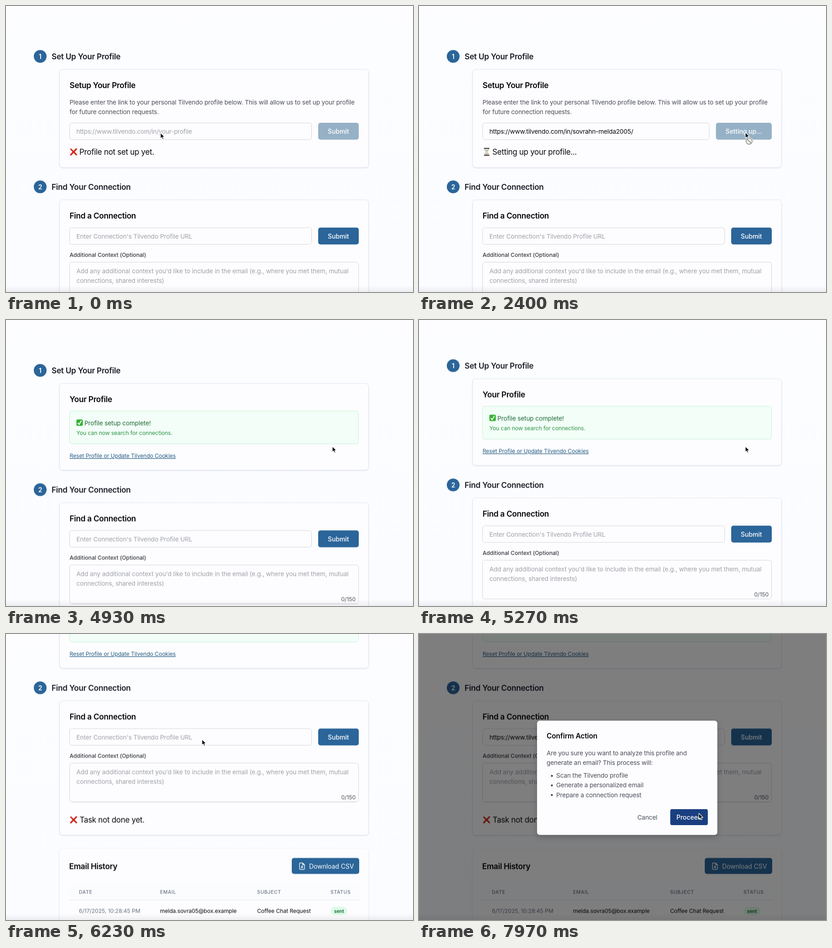
An HTML page that plays this animation: 893x627 px, repeating every 8000 ms.

```html
<!DOCTYPE html>
<html lang="en">
<head>
<meta charset="utf-8">
<title>Profile setup</title>
<style>
html, body { margin: 0; width: 100%; height: 100%; overflow: hidden; background: #fcfdff; }
svg { display: block; width: 893px; height: 627px; }

text { font: 400 13.7px Inter, "Liberation Sans", sans-serif; letter-spacing: -.011em; fill: #4a4e57; }
.heading { font-size: 17.2px; font-weight: 600; letter-spacing: -.015em; fill: #1b1d26; }
.title { font-size: 17.2px; font-weight: 600; letter-spacing: -.016em; fill: #050507; }
.status { font-size: 17px; letter-spacing: -.018em; fill: #0a0a0c; }
.value { letter-spacing: -.013em; fill: #08080a; }
.hint { letter-spacing: -.008em; fill: #9ea1a8; }
.hint.address { letter-spacing: -.018em; }
.small { font-size: 12.2px; letter-spacing: -.007em; }
.label { font-weight: 500; letter-spacing: -.002em; fill: #36393f; }
.caps { font-size: 10.5px; font-weight: 500; letter-spacing: .06em; fill: #6b7280; }
.white { font-size: 14px; font-weight: 500; letter-spacing: -.005em; fill: #fff; }
.digit { font-weight: 600; }
.mid { text-anchor: middle; }

.card { fill: #fdfdff; stroke: #e3e6f1; filter: drop-shadow(0 1px 1px rgba(40, 50, 90, .13)); }
.field { fill: #fdfdff; stroke: #d3d6dd; }
.blue { fill: #2b6599; }
.navy { fill: #193f80; }
.faded { fill: #96b1c6; }
.ring { fill: none; stroke-width: 2; }

/* Every part shares one 8 s clock. */
[class*="t-"] { animation: 8s step-end infinite; }
.t-empty { animation-name: empty; }
.t-pasted { animation-name: pasted; }
.t-ring { animation-name: ring; }
.t-hover { animation-name: hover; }
.t-form { animation-name: form; }
.t-busy { animation-name: busy; }
.t-setup { animation-name: setup; }
.t-done { animation-name: done; }
.t-lower { animation-name: lower; }
.t-empty2 { animation-name: empty2; }
.t-pasted2 { animation-name: pasted2; }
.t-ring2 { animation-name: ring2; }
.t-hover2 { animation-name: hover2; }
.t-modal { animation-name: modal; }
.t-proceed { animation-name: proceed; }
.t-arrow { animation-name: arrow; }
.t-hand { animation-name: hand; }
.t-scroll { animation-name: scroll; }
.t-pointer { animation-name: pointer; }

@keyframes empty { 0% { opacity: 1 } 11.25%, 100% { opacity: 0 } }
@keyframes pasted { 0% { opacity: 0 } 11.25%, 100% { opacity: 1 } }
@keyframes ring { 0% { opacity: 0 } 6.25% { opacity: 1 } 25%, 100% { opacity: 0 } }
@keyframes hover { 0% { opacity: 0 } 19.5% { opacity: 1 } 25%, 100% { opacity: 0 } }
@keyframes form { 0% { opacity: 1 } 25%, 100% { opacity: 0 } }
@keyframes busy { 0% { opacity: 0 } 25% { opacity: 1 } 53.75%, 100% { opacity: 0 } }
@keyframes setup { 0% { opacity: 1 } 53.75%, 100% { opacity: 0 } }
@keyframes done { 0% { opacity: 0 } 53.75%, 100% { opacity: 1 } }
@keyframes lower { 0% { transform: none } 53.75%, 100% { transform: translateY(-24.5px) } }
@keyframes empty2 { 0% { opacity: 1 } 82.5%, 100% { opacity: 0 } }
@keyframes pasted2 { 0% { opacity: 0 } 82.5%, 100% { opacity: 1 } }
@keyframes ring2 { 0% { opacity: 0 } 78.75% { opacity: 1 } 91.875%, 100% { opacity: 0 } }
@keyframes hover2 {
  0%, 72.25%, 91.875%, 100% { opacity: 0 }
  70%, 87.75% { opacity: 1 }
}
@keyframes modal { 0% { opacity: 0 } 91.875%, 100% { opacity: 1 } }
@keyframes proceed { 0% { opacity: 0 } 97.25%, 100% { opacity: 1 } }
@keyframes arrow {
  0%, 25%, 72.5%, 100% { opacity: 1 }
  20%, 70% { opacity: 0 }
}
@keyframes hand {
  0%, 25%, 72.5%, 100% { opacity: 0 }
  20%, 70% { opacity: 1 }
}
@keyframes scroll {
  0% { transform: none }
  65% { transform: none; animation-timing-function: cubic-bezier(.35, 0, .6, .95) }
  71.625% { transform: translateY(-229.5px); animation-timing-function: ease-out }
  75%, 100% { transform: translateY(-254px) }
}
@keyframes pointer {
  0% { transform: translate(339px, 278px) }
  13.75% { transform: translate(339px, 278px); animation-timing-function: ease-in }
  17.5% { transform: translate(624px, 273px); animation-timing-function: ease-out }
  20.5% { transform: translate(716px, 277px) }
  73% { transform: translate(716px, 277px); animation-timing-function: ease-in-out }
  77.5% { transform: translate(430px, 231px) }
  83.75% { transform: translate(430px, 231px); animation-timing-function: ease-in-out }
  88.5% { transform: translate(731px, 229px) }
  92.5% { transform: translate(731px, 229px); animation-timing-function: ease-in-out }
  98.75%, 100% { transform: translate(614px, 393px) }
}
</style>
</head>
<body>
<svg viewBox="0 0 893 627">
  <defs>
    <linearGradient id="sky" x2="0" y2="1">
      <stop offset="0" stop-color="#fdfdff"/>
      <stop offset=".12" stop-color="#fcfdff"/>
      <stop offset="1" stop-color="#fafcff"/>
    </linearGradient>
    <linearGradient id="foot" x2="0" y2="1">
      <stop offset="0" stop-opacity="0"/>
      <stop offset="1" stop-opacity=".06"/>
    </linearGradient>
    <text id="url" class="value">https://www.tilvendo.com/in/sovrahn-melda2005/</text>
    <path id="cross" d="M1 3 3 1 8.7 6.4 14.5.5 17 2.8 11.2 8.8 17 14.8 14.8 17 8.8 11.2 3 17.2.6 15 6.3 8.8Z" fill="#cf2a1c"/>
    <rect id="button" width="89" height="37" rx="5"/>
    <rect id="field" class="field" x="139.5" width="531" height="36.5" rx="5"/>
    <rect id="ring" x="138.5" width="533" height="38.5" rx="6"/>
  </defs>

  <rect width="893" height="627" fill="url(#sky)"/>

  <g class="t-scroll">
    <circle class="blue" cx="75" cy="110.5" r="14"/>
    <text class="white digit mid" x="75" y="115.5">1</text>
    <text class="heading" x="100" y="117">Set Up Your Profile</text>

    <g class="t-setup">
      <rect class="card" x="117.5" y="139" width="678" height="215" rx="7"/>
      <text class="title" x="139.5" y="179.5">Setup Your Profile</text>
      <text x="139.5" y="215.5">Please enter the link to your personal Tilvendo profile below. This will allow us to set up your profile</text>
      <text x="139.5" y="236.5">for future connection requests.</text>

      <g class="t-form">
        <use href="#field" y="256.5"/>
        <use href="#ring" class="ring t-ring" y="255.5" stroke="#c3d4ee"/>
        <text class="hint address t-empty" x="154.5" y="280">https://www.tilvendo.com/in/your-profile</text>
        <use href="#url" class="t-pasted" x="154.5" y="280"/>
        <use href="#button" class="faded" x="685" y="256"/>
        <use href="#button" class="blue t-pasted" x="685" y="256"/>
        <use href="#button" class="navy t-hover" x="685" y="256"/>
        <text class="white mid" x="729.3" y="280">Submit</text>
        <use href="#cross" x="139.5" y="311"/>
        <text class="status" x="161" y="326">Profile not set up yet.</text>
      </g>

      <g class="t-busy">
        <rect class="field" x="139.5" y="256.5" width="497.5" height="36.5" rx="5"/>
        <use href="#url" x="154.5" y="280"/>
        <rect class="faded" x="651.5" y="256" width="122.5" height="37" rx="5"/>
        <text class="white mid" x="712.5" y="280">Setting up...</text>
        <g transform="translate(142 311)">
          <path d="M2 2H11C11 6 8 7 7.5 8.7 8 10.5 11 11.5 11 15.5H2C2 11.5 5 10.5 5.5 8.7 5 7 2 6 2 2Z" fill="#e8eef2" stroke="#8b949b"/>
          <path d="M3.5 4.5H9.5L6.5 8ZM3 15C4 12.5 5.5 12 6.5 11 7.5 12 9 12.5 10 15Z" fill="#d6ae68"/>
          <path d="M.5 1H12.5M.5 16.5H12.5" stroke="#4c4038" stroke-width="2"/>
        </g>
        <text class="status" x="161" y="326">Setting up your profile...</text>
      </g>
    </g>

    <g class="t-done">
      <rect class="card" x="117.5" y="139" width="678" height="190" rx="7"/>
      <text class="title" x="139.5" y="179.5">Your Profile</text>
      <rect x="139.5" y="199.5" width="634" height="72" rx="5" fill="#f2fef7" stroke="#c3f3d6"/>
      <rect x="154.5" y="218" width="14" height="14" rx="2.5" fill="#34b233"/>
      <path d="M157.5 225.5 160.5 229 165.5 220.5" fill="none" stroke="#fff" stroke-width="2"/>
      <text x="172" y="230.5" style="fill:#23693a">Profile setup complete!</text>
      <text class="small" x="154.5" y="252" style="fill:#2f9045">You can now search for connections.</text>
      <text class="small" x="139.5" y="302" style="fill:#285d84" text-decoration="underline">Reset Profile or Update Tilvendo Cookies</text>
    </g>

    <g class="t-lower">
      <circle class="blue" cx="75" cy="396.5" r="14"/>
      <text class="white digit mid" x="75" y="401.5">2</text>
      <text class="heading" x="100" y="403">Find Your Connection</text>

      <rect class="card" x="117.5" y="425" width="678" height="294.5" rx="7"/>
      <text class="title" x="139.5" y="466">Find a Connection</text>
      <use href="#field" y="486"/>
      <use href="#ring" class="ring t-ring2" y="485" stroke="#4677cc"/>
      <text class="hint t-empty2" x="154.5" y="509.5">Enter Connection's Tilvendo Profile URL</text>
      <use href="#url" class="t-pasted2" x="154.5" y="509.5"/>
      <use href="#button" class="blue" x="685" y="485.8"/>
      <use href="#button" class="navy t-hover2" x="685" y="485.8"/>
      <text class="white mid" x="729.3" y="509.5">Submit</text>

      <text class="small label" x="139.5" y="550">Additional Context (Optional)</text>
      <rect class="field" x="139.5" y="561.5" width="634" height="85" rx="5"/>
      <text class="hint" x="154.5" y="585.5">Add any additional context you'd like to include in the email (e.g., where you met them, mutual</text>
      <text class="hint" x="154.5" y="606.5">connections, shared interests)</text>
      <text class="small" x="767" y="640.5" text-anchor="end">0/150</text>
      <use href="#cross" x="139.5" y="677"/>
      <text class="status" x="161.5" y="692">Task not done yet.</text>

      <rect class="card" x="117.5" y="748.5" width="678" height="300" rx="7" style="stroke:#f3f4fa"/>
      <text class="title" x="138.5" y="793.5">Email History</text>
      <rect class="blue" x="627" y="769.5" width="148" height="35" rx="5"/>
      <path d="M651 780.5H645.5Q644 780.5 644 782V793Q644 794.5 645.5 794.5H653.5Q655 794.5 655 793V784.5ZV784.5H655M649.5 785.5V791M647 788.7 649.5 791 652 788.7" fill="none" stroke="#fff" stroke-width="1.3"/>
      <text class="white" x="665" y="792.5" style="font-weight:400">Download CSV</text>

      <rect x="139" y="826" width="636" height="36" fill="#fbfcfe"/>
      <path d="M139 861.5H775" stroke="#e3e6ee"/>
      <text class="caps" x="160" y="847.5">DATE</text>
      <text class="caps" x="338" y="847.5">EMAIL</text>
      <text class="caps" x="551" y="847.5">SUBJECT</text>
      <text class="caps" x="712" y="847.5">STATUS</text>
      <text class="small" x="160" y="890" style="fill:#6b7280">6/17/2025, 10:28:45 PM</text>
      <text class="small value" x="338" y="890">melda.sovra05@box.example</text>
      <text class="small value" x="551" y="890">Coffee Chat Request</text>
      <rect x="712.5" y="876.5" width="36.5" height="18" rx="9" fill="#dcfce7"/>
      <text class="mid" x="730.7" y="889.5" style="font-size:10.6px;font-weight:600;fill:#1c6138">sent</text>
    </g>
  </g>

  <rect y="613" width="893" height="14" fill="url(#foot)"/>

  <g class="t-modal">
    <rect width="893" height="627" fill-opacity=".5"/>
    <rect x="259" y="190" width="395.5" height="250.5" rx="6" fill="#fdfdff" style="filter:drop-shadow(0 5px 7px rgba(0,0,0,.2))"/>
    <text class="title" x="280" y="229" style="font-size:15.5px;letter-spacing:-.008em">Confirm Action</text>
    <text x="280" y="266">Are you sure you want to analyze this profile and</text>
    <text x="280" y="287">generate an email? This process will:</text>
    <g fill="#4a4e57">
      <circle cx="291.5" cy="311" r="2.2"/>
      <circle cx="291.5" cy="332" r="2.2"/>
      <circle cx="291.5" cy="353" r="2.2"/>
    </g>
    <text x="301" y="315">Scan the Tilvendo profile</text>
    <text x="301" y="336">Generate a personalized email</text>
    <text x="301" y="357.5">Prepare a connection request</text>
    <text class="mid" x="501" y="407">Cancel</text>
    <rect class="blue" x="551.5" y="384" width="82" height="35" rx="4"/>
    <rect class="navy t-proceed" x="551.5" y="384" width="82" height="35" rx="4"/>
    <text class="white mid" x="592.5" y="407">Proceed</text>
  </g>

  <g class="t-pointer">
    <g class="t-arrow">
      <path d="M0 0V12.5L2.9 9.9 4.9 14.3 7 13.4 5.1 9.1H9.1Z" fill="#000" stroke="#fff" stroke-width="1.1" stroke-linejoin="round"/>
    </g>
    <g class="t-hand">
      <path d="M.5 2.5C.5.8 3 .8 3 2.5V7L4 6.3Q5.2 5.9 5.7 7 7.2 6.2 8 7.5 9.8 7 9.8 9V11.5Q9.5 13.5 8.5 14.5V16H2V14.5Q0 12.5-2.8 9.5C-3.5 8.2-2 7.3-.8 8.3L.5 9.5Z" fill="#fff" stroke="#111" stroke-linejoin="round"/>
      <path d="M3.5 10.5V13M5.5 10.5V13M7.5 10.5V13" stroke="#111" stroke-width=".8"/>
    </g>
    <g class="t-busy">
      <circle cx="8.3" cy="19.5" r="7.3" fill="#f2f2ee" stroke="#fff" stroke-width="2.5"/>
      <circle cx="8.3" cy="19.5" r="6.7" fill="none" stroke="#939a93" stroke-width="1.8"/>
      <path d="M3.6 15 13 24" stroke="#939a93" stroke-width="1.8"/>
    </g>
  </g>
</svg>
<script>
// Start all parts together on the page clock.
for (const part of document.getAnimations()) part.startTime = 0;
</script>
</body>
</html>
```
